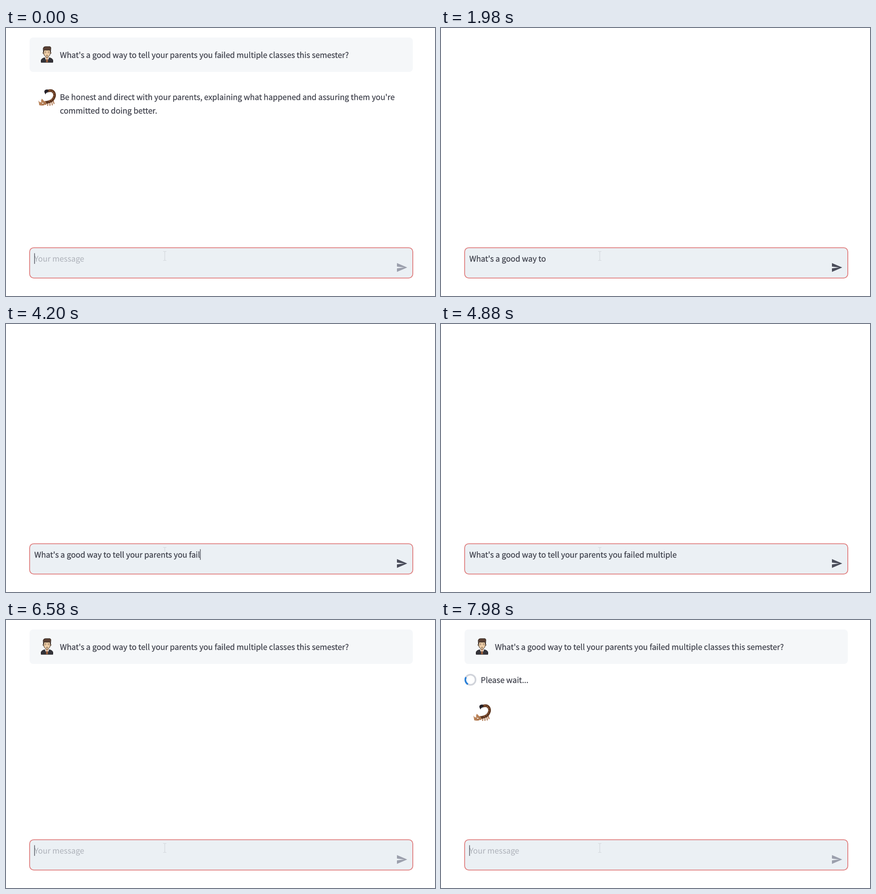
These frames come from a looping animation (947 px wide and 592 px high, 8000 ms). An HTML page:

```html
<!DOCTYPE html>
<html lang="en">
<head>
<meta charset="utf-8">
<title>Chat</title>
<style>
  html, body { margin: 0; width: 100%; height: 100%; overflow: hidden; background: #fff; }
  svg { display: block; width: 947px; height: 592px; }
  text {
    font: 17.24px "Noto Sans CJK SC", "Noto Sans CJK JP", "Noto Sans CJK KR", "Noto Sans CJK", "Noto Sans", sans-serif;
    fill: #3a3c47;
    stroke: #3a3c47;
    stroke-width: .25px;
    white-space: pre;
    text-rendering: geometricPrecision;
  }
  #hint { fill: #adb1b9; stroke: none; }
  .off { display: none; }
</style>
</head>
<body>
<svg viewBox="0 0 947 592">
  <defs>
    <g id="man">
      <path d="M77.500 76v-5q1-4 8-5.500h10q7 1.500 8 5.500v5z" fill="#34343a" stroke="#1f1d20"/>
      <path d="M85.500 65.500l5 8 5-8z" fill="#f5f2ee"/>
      <path d="M89.300 68h2.400l1 7.500h-4.400z" fill="#a8643c"/>
      <path d="M87.500 61h6v5l-3 2.500-3-2.500z" fill="#d9a97f"/>
      <g fill="#e3b98f" stroke="#2d241f" stroke-width=".8">
        <circle cx="82.800" cy="55" r="1.700"/>
        <circle cx="98.200" cy="55" r="1.700"/>
      </g>
      <path d="M83.500 48h14v9q-1 6-7 7.500-6-1.500-7-7.500z" fill="#f0cfa8" stroke="#2d241f"/>
      <path d="M82.500 53l-.500-8q1-4 5-4h10q3 1 2 5l-.500 7-1.500-4h-13z" fill="#5a4034" stroke="#2d241f"/>
      <path d="M85.800 53h3m3.400 0h3" stroke="#3a2a22"/>
      <path d="M87 55.500h.8m5.400 0h.8M88.500 60.500h4" stroke="#3a2a22" stroke-width="1.200"/>
    </g>
    <g id="scorpion" fill="none" stroke-linecap="round">
      <path d="M89 165l-1 4m5-5l-1 7m5-8v8m4-9l1 8m2-10l2 7" stroke="#a5663a" stroke-width="2"/>
      <path d="M93 139q8-2.500 12 2.500 4 6 1 12-3 7-10 9-5 2-10 2" stroke="#5f3822" stroke-width="6"/>
      <path d="M96 138q7 0 9.500 6 1.500 6-1.500 10.500-4 6-12 8" stroke="#9a6440" stroke-width="2" stroke-dasharray="1.500 4"/>
      <path d="M86 164q-5 0-6-3M87 166q-5 5-12 2.500" stroke="#b07a50" stroke-width="4"/>
      <path d="M79 156l5 5-4 4-3-3zM71.500 160l3 4 6 0-2 6.500-5 0z" fill="#b98258"/>
      <path d="M93 136q-7-1-8.500 4 0 3 3 7 0-4 5-5z" fill="#26222a"/>
    </g>
  </defs>

  <g id="question">
    <rect x="52" y="21" width="846" height="76" rx="8" fill="#f5f7f9"/>
    <use href="#man"/>
    <text x="119" y="66" class="ask"></text>
  </g>

  <g id="answer">
    <use href="#scorpion"/>
    <text x="119" y="158.500">Be honest and direct with your parents, explaining what happened and assuring them you're</text>
    <text x="119" y="188.500">committed to doing better.</text>
  </g>

  <g id="wait">
    <g fill="none" stroke-width="3.600">
      <circle cx="65" cy="132" r="11.300" stroke="#d0d3da"/>
      <circle id="arc" cx="65" cy="132" r="11.300" stroke="#2a80d8" pathLength="360" stroke-dasharray="90 270"/>
    </g>
    <text x="87.800" y="139">Please wait...</text>
    <use href="#scorpion" y="51"/>
  </g>

  <rect x="52.200" y="485.300" width="845.800" height="67" rx="9" fill="#ebf0f4" stroke="#df7b7b" stroke-width="1.800"/>
  <path id="send" d="M863 538.700L885.700 529 863 519.300V526.900L879 529 863 531.100z"/>
  <g fill="none" stroke="#d3d7dc" stroke-width="1.200">
    <path d="M347 493.500h2.500l1 1 1-1h2.500M350.500 494.500V503"/>
    <path id="beam" d="M350.500 503v9.500l-1 1h-2.500m3.500-1l1 1h2.500"/>
  </g>
  <text id="hint" x="62.500" y="516">Your message</text>
  <text id="typed" x="62.500" y="516"></text>
  <rect id="caret" y="497.500" width="1.300" height="23.500" fill="#3f424c"/>
</svg>

<script>
  const LOOP = 8000, RESET = 20, SUBMIT = 6420, POSTED = 6580, WAITING = 6700;
  const BLINK = 606, SPIN = 600;
  const MESSAGE = "What's a good way to tell your parents you failed multiple classes this semester?";

  // Typing rhythm: [time in ms, characters entered]
  const keys = [
    [580, 0], [820, 3], [1540, 14], [1660, 15], [1980, 20], [2079, 20.9], [2400, 29],
    [2500, 30], [3240, 36], [3380, 39], [3499, 39.9], [4080, 46], [4180, 47], [4880, 58],
    [4920, 59], [5020, 60], [5160, 61], [5880, 72], [6000, 73], [6160, 77], [6279, 77.9], [6360, 81]
  ];
  // Pauses in which the caret is hidden while typing
  const pauses = [[1940, 2080], [4840, 4920]];

  const $ = id => document.getElementById(id);
  const show = (id, on) => $(id).classList.toggle("off", !on);
  document.querySelector(".ask").textContent = MESSAGE;

  function typedCount(t) {
    if (t < keys[0][0] || t >= SUBMIT) return 0;
    const i = keys.findIndex(k => k[0] > t);
    if (i < 0) return MESSAGE.length;
    const [t0, n0] = keys[i - 1], [t1, n1] = keys[i];
    return Math.floor(n0 + (n1 - n0) * (t - t0) / (t1 - t0) + 1e-6);
  }

  function caretOn(t) {
    if (t >= POSTED) return (t - POSTED) % BLINK < BLINK / 2;
    return !pauses.some(([from, to]) => t >= from && t < to);
  }

  function draw(t) {
    const n = typedCount(t), old = t < RESET;
    show("question", old || t >= POSTED);
    show("answer", old);
    show("wait", t >= WAITING);
    show("hint", n === 0);
    show("beam", n < 36);
    show("caret", caretOn(t));

    const typed = $("typed");
    if (typed.textContent.length !== n) typed.textContent = MESSAGE.slice(0, n);
    $("caret").setAttribute("x", 62.4 + (n ? typed.getComputedTextLength() : 0));
    $("send").setAttribute("fill", n ? "#4a4d5a" : "#9b9fac");

    const angle = 20 - 45 + (t - 7140) * 360 / SPIN;
    $("arc").setAttribute("transform", `rotate(${angle} 65 132)`);
  }

  const start = performance.now();
  function tick() {
    draw((performance.now() - start) % LOOP);
    requestAnimationFrame(tick);
  }
  tick();
</script>
</body>
</html>
```
